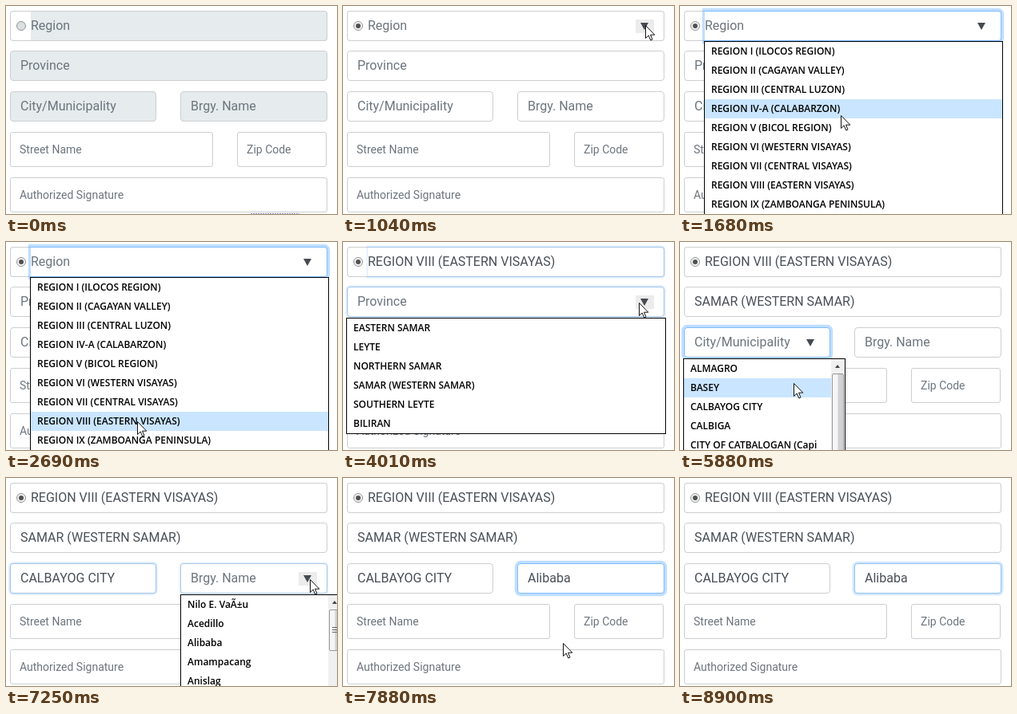
Animation of 414x261 px, one loop 8970 ms. Source, as an HTML page:

```html
<!DOCTYPE html>
<html lang="en">
<head>
<meta charset="utf-8">
<title>Address form</title>
<style>
  html, body { margin: 0; width: 100%; height: 100%; overflow: hidden; background: #fff; }
  body { position: relative; }
  div, svg { position: absolute; box-sizing: border-box; }
  .field { border: 1px solid #cccecf; border-radius: 4px; background: #fff; color: #6c757d;
    font: 16px Roboto, sans-serif; padding-left: 12px; white-space: nowrap; }
  .small { font-size: 14px; padding-left: 11px; border-radius: 3px; }
  .addon { border-right: 0; border-radius: 4px 0 0 4px; }
  .joined { border-left: 0; border-radius: 0 4px 4px 0; padding-left: 0; }
  .arrow { right: 12px; top: 10px; width: 23px; height: 17px; }
  .arrow::after { content: ""; position: absolute; left: 6px; top: 4px;
    border: solid transparent; border-width: 9px 5.5px 0; border-top-color: #454b51; }
  .list { border: 1px solid #000; background: #fff; overflow: hidden; color: #000;
    font: 600 12px/24px "Open Sans", sans-serif; white-space: nowrap; }
  .row { left: 0; right: 0; height: 24px; padding-left: 8px; }
  .bar { right: 0; top: 0; bottom: 0; width: 17px; background: #f0f0f0; }
  .bar::before { content: ""; position: absolute; left: 5px; top: 7px;
    border: solid transparent; border-width: 0 3.5px 4px; border-bottom-color: #444; }
  .thumb { left: 1px; top: 18px; width: 15px; border: 1px solid #979797; border-radius: 2px;
    background: linear-gradient(90deg, #f5f5f5 45%, #d2d2d4 55%); }
  .grip { left: 3px; top: 21px; width: 7px; height: 8px;
    background: repeating-linear-gradient(#666 0 1px, transparent 1px 3px); }
  #dash { left: 306px; top: 260px; width: 61px; height: 1px;
    background: repeating-linear-gradient(90deg, #8c93b5 0 2px, #fff 2px 3px); }
</style>
</head>
<body>
<script>
const LOOP = 8970, ENABLE = 778, FADE = 150, ROW = 24;

// Bursts of screen updates: start, end, number of steps
const bursts = [[0, 0, 1], [120, 190, 2], [340, 1040, 9], [1210, 1210, 1], [1510, 1900, 6],
  [2070, 2690, 9], [3010, 3860, 12], [3940, 4640, 10], [4890, 5500, 9], [5650, 6120, 7],
  [6270, 6810, 8], [7040, 7650, 8], [7880, 7880, 1], [8260, 8490, 4], [8900, 8900, 1]];

// Pointer path: time, x, y
const path = [[0, 330, 275], [119, 330, 275], [120, 291, 240], [190, 254, 217], [690, 17, 23],
  [778, 17, 23], [1040, 378, 24], [1210, 378, 25], [1510, 378, 25], [1666, 201, 137],
  [1900, 180, 177], [2690, 164, 225], [3010, 164, 225], [3860, 378, 72], [3940, 378, 72],
  [4640, 155, 177], [4890, 155, 177], [5500, 163, 125], [5728, 163, 125], [5885, 142, 177],
  [6120, 130, 207], [6270, 130, 207], [6810, 383, 127], [7214, 380, 127], [7650, 275, 207],
  [8180, 275, 207], [8490, 350, 275], [LOOP, 350, 275]];

const fields = [
  { box: [31, 6, 371, 38], hint: "Region", open: 1510, pick: 3010, blur: 3940, pickRow: 7,
    list: [30, 44, 374, 400], cls: " joined",
    rows: ["REGION I (ILOCOS REGION)", "REGION II (CAGAYAN VALLEY)", "REGION III (CENTRAL LUZON)",
      "REGION IV-A (CALABARZON)", "REGION V (BICOL REGION)", "REGION VI (WESTERN VISAYAS)",
      "REGION VII (CENTRAL VISAYAS)", "REGION VIII (EASTERN VISAYAS)",
      "REGION IX (ZAMBOANGA PENINSULA)"] },
  { box: [5, 56, 397, 38], hint: "Province", open: 3940, pick: 4890, blur: 5650, pickRow: 3,
    list: [4, 95, 400, 146],
    rows: ["EASTERN SAMAR", "LEYTE", "NORTHERN SAMAR", "SAMAR (WESTERN SAMAR)",
      "SOUTHERN LEYTE", "BILIRAN"] },
  { box: [5, 107, 183, 38], hint: "City/Municipality", open: 5650, pick: 6270, blur: 7150, pickRow: 2,
    list: [4, 146, 203, 400], thumb: 300,
    rows: ["ALMAGRO", "BASEY", "CALBAYOG CITY", "CALBIGA", "CITY OF CATBALOGAN (Capi"] },
  { box: [218, 107, 184, 38], hint: "Brgy. Name", open: 7150, pick: 7880, blur: 8860, pickRow: 2,
    list: [218, 146, 203, 400], thumb: 52,
    rows: ["Nilo E. VaÃ±u", "Acedillo", "Alibaba", "Amampacang", "Anislag"] }
];

function add(parent, cls, box, text = "") {
  const el = document.createElement("div");
  el.className = cls;
  if (box) {
    ["left", "top", "width", "height"].forEach((k, i) => el.style[k] = box[i] + "px");
  }
  el.textContent = text;
  parent.append(el);
  return el;
}

function addField(cls, box, text) {
  const el = add(document.body, "field" + cls, box, text);
  el.style.lineHeight = box[3] - 2 + "px";
  return el;
}

addField(" small", [5, 158, 254, 44], "Street Name");
addField(" small", [289, 158, 112, 44], "Zip Code");
addField(" small", [5, 215, 397, 44], "Authorized Signature");
const addon = addField(" addon", [5, 6, 26, 38], "");
addon.innerHTML = `<svg style="left:6px;top:11px" width="14" height="14">
  <circle cx="7" cy="7" r="5.5" stroke="#8f9496"/><circle cx="7" cy="7" r="3" fill="#505050"/></svg>`;
const [ring, dot] = addon.querySelectorAll("circle");

for (const f of fields) {
  f.el = addField(f.cls || "", f.box, "");
  f.text = document.createElement("span");
  f.el.append(f.text);
  f.arrow = add(f.el, "arrow");
}
for (const f of fields) {
  f.menu = add(document.body, "list", f.list);
  f.rowEls = f.rows.map((name, i) => {
    const el = add(f.menu, "row", null, name);
    el.style.top = i * ROW + "px";
    return el;
  });
  if (f.thumb) {
    const thumb = add(add(f.menu, "bar"), "thumb");
    thumb.style.height = f.thumb + "px";
    if (f.thumb < 100) add(thumb, "grip");
  }
}
const dash = add(document.body, "");
dash.id = "dash";
document.body.insertAdjacentHTML("beforeend", `<svg id="pointer" width="14" height="21">
  <path d="M.5.5V16.5L4.2 13 6.8 19 9 18 6.5 12.2H11.8Z" fill="#fff" stroke="#111"/></svg>`);
const pointer = document.getElementById("pointer");

const clamp = v => Math.max(0, Math.min(1, v));
const mix = (a, b, k) => a + (b - a) * k;
const show = (el, on) => el.style.visibility = on ? "visible" : "hidden";
const inside = (x, y, [l, t, w, h]) => x >= l && x < l + w && y >= t && y < t + h;

// Time of the latest screen update
function snap(t) {
  const [a, b, n] = bursts.findLast(s => s[0] <= t);
  const step = (b - a) / (n - 1 || 1);
  return a + step * Math.min(n - 1, Math.floor((t - a) / (step || 1) + 0.1));
}

function pointerAt(t) {
  const i = Math.max(1, path.findIndex(p => p[0] >= t));
  const [a, ax, ay] = path[i - 1], [b, bx, by] = path[i];
  const k = clamp((t - a) / (b - a)), e = k * k * (3 - 2 * k);
  return [Math.round(mix(ax, bx, e)), Math.round(mix(ay, by, e))];
}

function draw(t) {
  const [x, y] = pointerAt(t);
  const on = t >= ENABLE;
  const opened = fields.find(f => t >= f.open && t < f.pick);
  pointer.style.transform = `translate(${x}px, ${y}px)`;
  ring.setAttribute("fill", on ? "#f4f4f4" : "#dde0e1");
  show(dot, on);
  show(dash, t < 340);

  for (const f of fields) {
    const picked = t >= f.pick;
    const focus = clamp((t - f.open) / FADE) - clamp((t - f.blur) / FADE);
    const s = f.el.style;
    f.text.textContent = picked ? f.rows[f.pickRow] : f.hint;
    s.color = picked ? "#495057" : "#6c757d";
    s.background = on ? "#fff" : "#e6ebed";
    s.borderColor = `rgb(${mix(204, 128, focus)}, ${mix(206, 189, focus)}, ${mix(207, 255, focus)})`;
    s.boxShadow = `0 0 0 ${3.2 * focus}px rgba(0, 123, 255, ${0.25 * focus})`;
    s.zIndex = focus > 0 ? 1 : 0;

    const [l, top, w] = f.box;
    const over = inside(x, y, f.box);
    show(f.arrow, on && (f === opened || (!opened && over)));
    f.arrow.style.background = inside(x, y, [l + w - 36, top + 10, 23, 19]) ? "#ececec" : "none";

    f.menu.style.display = f === opened ? "block" : "none";
    f.menu.style.zIndex = 2;
    const hot = inside(x, y, f.list) ? Math.floor((y - f.list[1] - 1) / ROW) : -1;
    f.rowEls.forEach((el, i) => el.style.background = i === hot ? "#cae5ff" : "none");
  }
}

pointer.style.cssText += "left:0;top:0;z-index:3";
const start = performance.now();
function tick() {
  draw(snap((performance.now() - start) % LOOP));
  requestAnimationFrame(tick);
}
tick();
</script>
</body>
</html>
```
